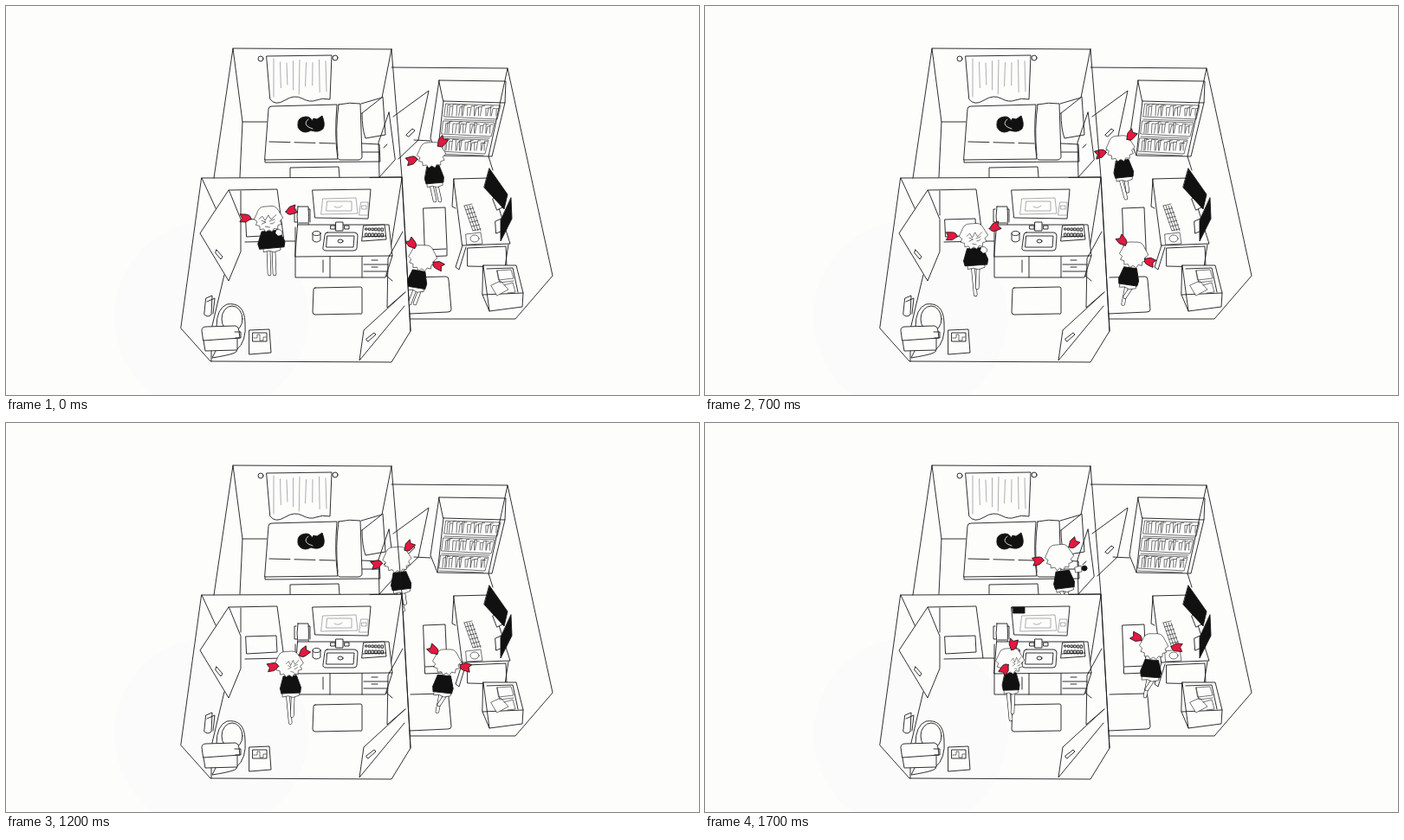
Recreate the animation shown at these times as an HTML page. Size 800 by 450 pixels, loop 1900 ms.

```html
<!DOCTYPE html>
<html lang="en">
<head>
<meta charset="utf-8">
<title>Small flat</title>
<style>
  html, body { margin: 0; width: 100%; height: 100%; overflow: hidden; background: #fdfdfc; }
  svg { display: block; width: 800px; height: 450px; }
  path, ellipse, circle { stroke: #191919; fill: none; stroke-width: .9; stroke-linejoin: round; stroke-linecap: round; }
  .thin, .thin path { stroke-width: .6; }
  .ink { fill: #111; }
  .paper { fill: #fdfdfc; }
  .pale { stroke: #777; stroke-width: .6; }
  .ear { fill: #e3193f; stroke-width: .8; }
  .hair { fill: #fdfdfc; stroke-width: .6; }
  .leg { stroke-width: 4.4; }
  .skin { stroke: #fdfdfc; stroke-width: 3.2; }
  .shade { fill: #fbfbfb; stroke: none; }
</style>
</head>
<body>
<svg viewBox="0 0 800 450">
  <defs>
    <filter id="wobble" filterUnits="userSpaceOnUse" x="0" y="0" width="800" height="450" color-interpolation-filters="sRGB">
      <feTurbulence type="fractalNoise" baseFrequency=".06" numOctaves="2" seed="4"/>
      <feDisplacementMap in="SourceGraphic" scale="1.2" xChannelSelector="R" yChannelSelector="G"/>
    </filter>
    <clipPath id="behindBath"><path d="M0 0H800V450H471L457 198H0Z"/></clipPath>
  </defs>
  <circle class="shade" cx="237" cy="360" r="112"/>

  <g filter="url(#wobble)">
    <!-- walls -->
    <path d="M240 199L262 49L445 50M262 49L273 134L270 198M273 134H301M445 50L434 106"/>
    <path d="M445 71L579 72L631 312L588 362L467 362M579 72L557 174L562 190M471 155L490 156"/>
    <path d="M226 199L457 198L467 376L445 412L236 411L202 373ZM226 199L243 236M457 199L439 312L446 318M252 311L237 374V411"/>

    <!-- bedroom -->
    <path d="M301 58L376 57L374 108Q365 106 358 109T342 107T322 109T305 108Z"/>
    <path id="folds" class="pale"/>
    <circle cx="294" cy="61" r="3"/><circle cx="380" cy="60" r="3"/>
    <path class="paper" d="M303 119Q303 116 307 116L382 114Q379 150 383 177L299 178ZM299 178V181L432 180L431 160L411 159M410 113L434 106M411 169H431"/>
    <path class="paper" d="M384 114Q397 111 409 113L411 174Q411 178 406 178H386Q382 178 383 172Q380 142 384 114Z"/>
    <path class="paper" d="M411 124L435 105L438 149L415 153Q411 142 411 124Z"/>
    <path stroke-dasharray="24 5" d="M304 157L380 159"/>
    <path d="M328 198V187L384 186L385 198"/>
    <path class="ink" d="M337 137Q336 129 346 128Q352 128 353 133L355 130L359 131L365 127Q369 137 366 142Q361 147 352 144Q345 148 340 144Q336 141 337 137Z"/>
    <path d="M349 131Q343 136 349 140L354 142" style="stroke:#fdfdfc;stroke-width:.8"/>
    <path d="M442 123L430 158L431 198L449 178ZM436 164L440 160"/>

    <!-- study -->
    <path d="M453 177L476 155L488 98L447 128"/>
    <path class="paper" d="M462 149L469 142L472 144L465 151Z"/>
    <path d="M500 86L577 87L576 112L505 110ZM500 86L490 153L498 173L505 110M498 173L561 174L576 112"/>
    <path id="shelves" class="thin"/>
    <path d="M482 234L507 233L509 279V289L484 290ZM484 282L508 281"/>
    <path class="paper" d="M517 200L558 199L582 275L527 277ZM517 200L515 232L519 234M527 277L519 302L523 305L531 279M533 280L577 278L578 302L533 301ZM580 276L576 302"/>
    <path class="paper" d="M562 223L568 221L573 233L567 236ZM565 249L574 245L578 258L566 263Z"/>
    <path class="ink" d="M558 188L579 218L575 235L552 210ZM583 222L584 246L571 272V248Z"/>
    <path id="keyboard" class="thin"/>
    <path class="thin" d="M531 264L548 262L550 275L532 276Z"/>
    <ellipse class="thin" cx="541" cy="269" rx="5" ry="4"/>
    <path d="M467 314L508 313Q511 313 511 317L514 351Q514 354 510 354L466 356"/>
    <path class="paper" d="M551 300L589 300L597 332L596 348L558 353L550 334ZM550 334L597 332M551 300L558 353M555 304L585 303L591 331"/>
    <path class="paper thin" d="M567 306L583 305L586 315L569 317ZL570 320L586 318M560 323L571 318L580 328L567 335ZM575 323L585 320L588 331L579 332"/>

    <!-- bathroom -->
    <path d="M258 213L313 212L321 272L276 273M271 214V242M277 247L312 246L313 265L278 267ZM321 272H334"/>
    <path class="paper" d="M257 213L224 263L257 318L271 284V247Z"/>
    <path class="paper" d="M243 282L250 290L248 293L242 286Z"/>
    <path class="paper" d="M354 213L421 212L418 246L357 245Z"/>
    <path class="pale" d="M366 223L404 222L406 240L364 241ZM371 226H399V237H370ZM379 232Q384 235 388 231M410 227H418V242H408ZM411 231H416V235H411Z"/>
    <path id="mirrored" class="ink" d="M0 0H14V7H1Z"/>
    <path class="paper" d="M337 232H349Q350 243 349 255H337Q335 243 337 232ZM335 235H333V250H336M349 235H351V250M338 251H348"/>
    <path class="paper" d="M337 253L442 253L446 289L334 290ZM334 256V314L438 314L446 289M374 290V314M411 290V314M366 294V308"/>
    <path id="drawers"/>
    <path class="paper" d="M371 262H402Q406 262 406 266L405 280Q405 283 401 283H370Q365 283 366 279L368 265Q368 262 371 262ZM371 266H402L401 279H370ZM381 250H389V260H381ZM375 254H380V258H375ZM391 254H396V258H391Z"/>
    <ellipse cx="386" cy="272" rx="3" ry="2"/>
    <path class="paper" d="M354 263V271Q358 275 363 271V263"/>
    <ellipse class="paper" cx="358.5" cy="263" rx="4.5" ry="2.5"/>
    <path class="paper" d="M413 254L437 253L439 270L411 272ZM412 267L438 266"/>
    <path id="bottles"/>
    <path d="M458 261L441 292L440 349L461 331"/>
    <path class="paper" d="M461 331L413 375L408 410L460 347"/>
    <path class="paper" d="M416 385L425 378L427 380L418 388Z"/>
    <path d="M357 326L409 325Q411 325 411 327V355Q411 357 408 356L357 357Q354 357 354 354L355 328Q355 326 357 326Z"/>
    <path class="paper" d="M231 338L238 335L237 357Q233 361 229 357ZM232 342L241 338L239 356"/>
    <path class="paper" d="M243 371Q243 350 255 345Q275 342 276 366Q278 388 266 398Q270 402 238 407L246 391Z"/>
    <ellipse class="paper" cx="261" cy="362" rx="12" ry="15"/>
    <path class="paper" d="M226 375Q226 371 231 371L265 370Q269 371 269 376L270 384L228 387ZM228 387L230 399L267 398V385M264 377H271V384H265"/>
    <path class="paper" d="M281 375L304 374L306 401L281 403ZM285 378H301V388H285Z"/>
    <path class="thin" d="M286 384H290V380H293V387H297V383H300"/>
  </g>

  <g id="people"></g>
  <path d="M445 50L457 198L467 376" filter="url(#wobble)"/>
  <path d="M420 198.5L457 198"/>
</svg>

<script>
const LOOP = 1900;
const STEPS = [0, 400, 500, 700, 800, 900, 1100, 1200, 1300, 1400, 1600, 1700];

// walk: start, bend and end of the head's curve; the rest are first and last offsets
const BATHER = {
  walk: [[303, 246], [311, 291], [352, 275]],
  ears: [[[-26, -1], [-6, 9]], [[26, -9], [4, -18]]],
  body: [[3, 24], [1, 24]], width: [31, 20], foot: [1, 40]
};
const SLEEPER = {
  walk: [[491, 172], [477, 156], [409, 155]],
  ears: [[[-22, 6], [-24, 4]], [[12, -14], [16, -15]]],
  body: [[3, 23], [5, 26]], width: [22, 24], foot: [4, 30]
};
const WORKER = {
  walk: [[481, 291], [509, 288], [518, 258]],
  ears: [[[-12, -16], [-19, -10]], [[17, 9], [26, 2]]],
  body: [[-6, 25], [-3, 26]], width: [23, 24], foot: [-6, 28]
};

const SHAPES = {
  ear: 'M-6 -1L0 -5L7 -5L4.500 -1L7 4L0 4Q-5 4 -6 -1Z',
  hair: shaggyOutline(),
  body: 'M-7 -10L7 -10L11 4L10 10L-10 10L-11 4Z',
  skirt: 'M-9 8V14L-3 13L2 15L9 13V8Z',
  face: 'M-8 1L-3 3L-8 5M1 2L7 0M2 5Q5 6 7 3M-4 8L1 9M-11 -1L-7 -4L-4 1L0 -5L3 0L9 -5',
  hand: 'M9 13Q14 11 16 16Q16 20 11 20L8 17Z',
  arm: 'M18 12L25 10L26 17L19 18Z'
};

const byId = id => document.getElementById(id);
const mix = (a, b, u) => a + (b - a) * u;
const mixPoint = ([a, b], u) => a.map((v, i) => mix(v, b[i], u));
const degrees = (y, x) => Math.atan2(y, x) * 180 / Math.PI;
const range = n => Array.from({ length: n }, (_, i) => i);
const show = (node, on) => node.setAttribute('visibility', on ? 'visible' : 'hidden');
const place = (node, [x, y], turn = 0, sx = 1) =>
  node.setAttribute('transform', `translate(${x} ${y}) rotate(${turn}) scale(${sx} 1)`);

function bend([a, b, c], u) {
  return mixPoint([mixPoint([a, b], u), mixPoint([b, c], u)], u);
}

// a smooth crown and a jagged hem
function shaggyOutline() {
  const points = Array.from({ length: 28 }, (_, i) => {
    const angle = i / 28 * 2 * Math.PI, hem = Math.sin(angle) > -.2;
    const r = hem ? 16.5 - 3 * (i % 2) : 15.5 + .7 * Math.sin(i * 5);
    return `${r * Math.cos(angle)} ${r * Math.sin(angle) * .96}`;
  });
  return `M${points.join('L')}Z`;
}

function add(parent, tag, attrs = {}) {
  const node = document.createElementNS('http://www.w3.org/2000/svg', tag);
  for (const name in attrs) node.setAttribute(name, attrs[name]);
  return parent.appendChild(node);
}
const shape = (parent, name, cls) => add(parent, 'path', { d: SHAPES[name], class: cls });

function makePerson(plan, clip) {
  const root = add(byId('people'), 'g', clip ? { 'clip-path': 'url(#behindBath)' } : {});
  const legs = [0, 1].map(() => ['leg', 'skin'].map(cls => add(root, 'path', { class: cls })));
  const skirt = shape(root, 'skirt', 'hair');
  const body = shape(root, 'body', 'ink');
  const head = add(root, 'g');
  shape(head, 'hair', 'hair');
  const ears = plan.ears.map(() => shape(root, 'ear', 'ear'));
  return { plan, root, legs, skirt, body, head, ears };
}

function drawPerson({ plan, legs, skirt, body, head, ears }, step) {
  const u = step / (STEPS.length - 1);
  const at = bend(plan.walk, u);
  const offset = mixPoint(plan.body, u);
  const [bx, by] = [at[0] + offset[0], at[1] + offset[1]];
  const lean = degrees(offset[1], offset[0]) - 90;
  const wide = mix(...plan.width, u) / 22;
  place(head, at, lean * .3);
  place(body, [bx, by], lean * .7, wide);
  place(skirt, [bx, by], lean * .7, Math.min(wide, 1.1));
  ears.forEach((ear, i) => {
    const [x, y] = mixPoint(plan.ears[i], u * u);
    place(ear, [at[0] + x, at[1] + y], degrees(y, x));
  });
  legs.forEach((leg, i) => {
    const side = 2 * i - 1, swing = side * Math.sin(step * Math.PI / 2);
    const x = bx + plan.foot[0] + 3 * side + 2 * swing, y = by + plan.foot[1] + 4 * swing;
    leg.forEach(p => p.setAttribute('d', `M${bx + 3 * side} ${by + 12}L${x} ${y}`));
  });
  return at;
}

function furnish() {
  const draw = (id, parts) => byId(id).setAttribute('d', parts.join(''));
  draw('folds', range(9).map(i => {
    const x = 309 + i * 7.5, top = 61 + 5 * Math.abs(Math.sin(i * 4));
    return `M${x} ${top}L${x + Math.sin(i)} ${105 - 14 * Math.abs(Math.sin(i * 2.3))}`;
  }));
  draw('shelves', range(3).flatMap(row => {
    const left = 508 - 3 * row, top = 113 + 20 * row, span = 63 - 4 * row;
    const books = range(18).map(i => {
      const x = left + 2 + i * span / 19 + Math.sin(i * 5 + row), y = top + i * .2 + 1.5 + 1.5 * Math.sin(i * 2 + row);
      return `M${x + 3} ${y}H${x}L${x - 1 + Math.sin(i * 3)} ${top + 14}`;
    });
    return [`M${left} ${top}l${span} 2l-4 16L${left - 2} ${top + 15}Zm-2 18l${span - 4} 2`, ...books];
  }));
  draw('keyboard', [
    ...range(4).map(i => `M${529 + i * 3} 231l10 29`),
    ...range(7).map(i => `M${529 + i * 1.7} ${231 + i * 4.8}l9 -2`)
  ]);
  draw('drawers', range(2).map(i => `M413 ${299 + i * 8}H441M422 ${294 + i * 8}H429`));
  draw('bottles', range(12).map(i => {
    const x = 415 + i % 6 * 3.7, y = 257 + 6 * Math.floor(i / 6);
    return `M${x} ${y}h2v${2 + Math.abs(2 * Math.sin(i * 3))}h-2Z`;
  }));
}

const desk = makePerson(WORKER, true);
const back = makePerson(SLEEPER, true);
const front = makePerson(BATHER, false);
const face = shape(front.head, 'face', 'thin');
const hand = shape(front.root, 'hand', 'hair');
const arm = add(back.root, 'g');
shape(arm, 'arm', 'hair');
add(arm, 'ellipse', { cx: 29, cy: 13, rx: 3, ry: 3, class: 'ink' });
const mirrored = byId('mirrored');

let shown = -1;
function render(now) {
  const step = STEPS.filter(t => t <= now % LOOP).length - 1;
  if (step !== shown) {
    shown = step;
    drawPerson(desk, step);
    place(arm, drawPerson(back, step));
    place(hand, drawPerson(front, step));
    place(face, [step * .7, 1], 0, 1 - step * .04);
    place(mirrored, [355, 213], 0, Math.max(0, (step - 8) / 3));
    show(mirrored, step > 8);
    show(hand, step < 7);
    show(arm, step > 9);
  }
  requestAnimationFrame(() => render(performance.now()));
}

furnish();
render(0);
</script>
</body>
</html>
```
